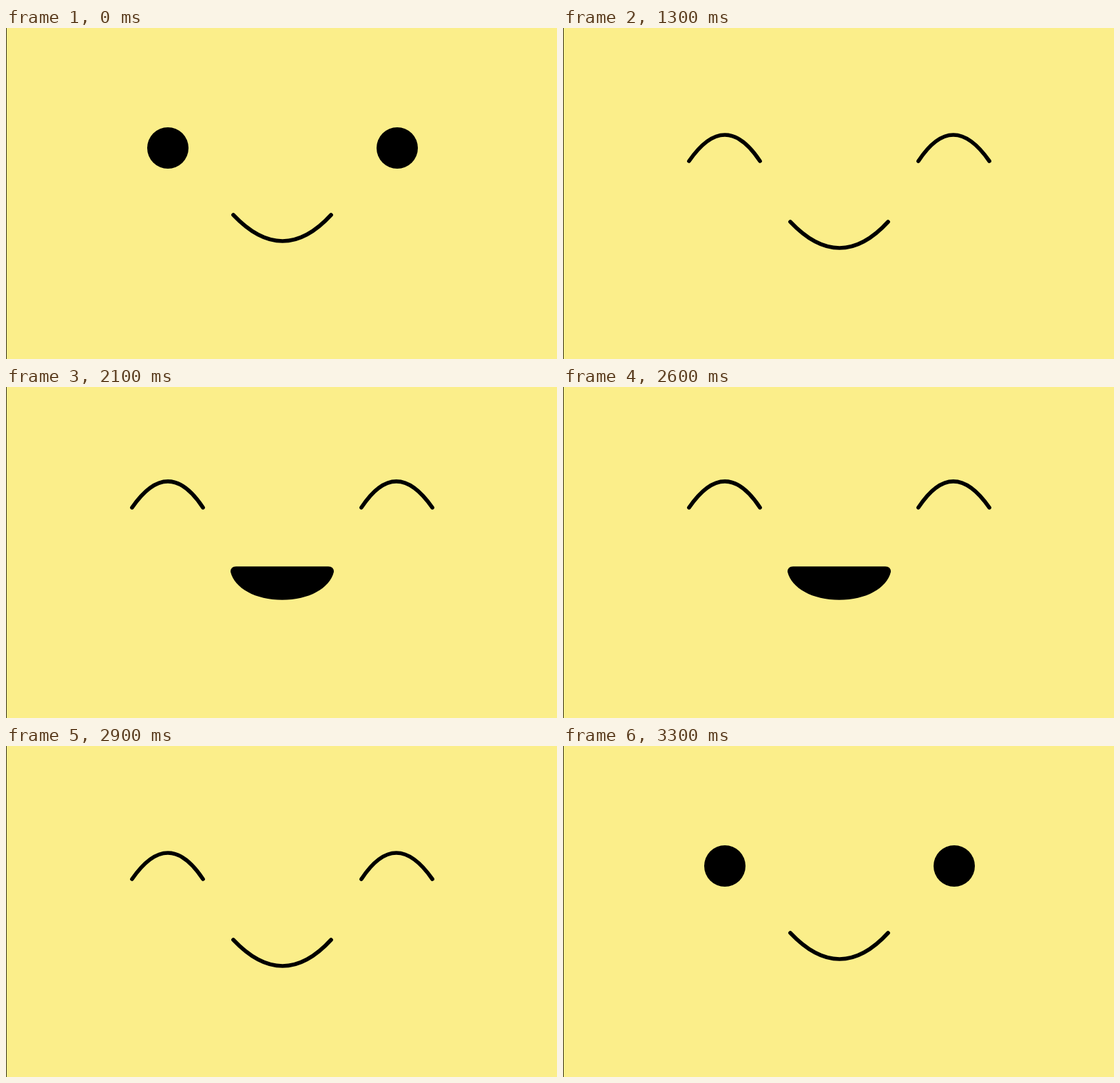
Write an HTML page that moves like this. It is 800x480 px and loops after 3400 ms.

```html
<!DOCTYPE html>
<html lang="en">
<head>
<meta charset="utf-8">
<title>Smiling face</title>
<style>
  html, body { margin: 0; height: 100%; overflow: hidden; background: #fbee8a; }
  svg { display: block; width: 800px; height: 480px; }
  .line { fill: none; stroke: #000; stroke-width: 5.7; stroke-linecap: round; }
</style>
</head>
<body>
<svg viewBox="0 0 800 480">
  <rect width="800" height="480" fill="#fbee8a"/>
  <rect width="1" height="480" fill="#33301c"/>
  <g id="openEyes">
    <circle cx="235" cy="174" r="30"/>
    <circle cx="568" cy="174" r="30"/>
  </g>
  <path id="shutEyes" class="line" d="M183 193Q235.5 117 286 193M516 193Q566 117 619 193"/>
  <path id="smile" class="line" d="M330 271Q402 347 472 271"/>
  <path id="laugh"/>
</svg>
<script>
const LOOP = 3400, STEP = 100;
const EYE_LIFT = 18.2, MOUTH_DIP = 10;

const [openEyes, shutEyes, smile, laugh] =
  ["openEyes", "shutEyes", "smile", "laugh"].map(id => document.getElementById(id));

// Linear rise from 0 to 1 between two times.
const ramp = (time, from, to) => Math.min(1, Math.max(0, (time - from) / (to - from)));

function place(part, visible, dy) {
  part.style.display = visible ? "" : "none";
  part.setAttribute("transform", `translate(0 ${dy})`);
}

// The upper lip sags until the mouth is fully open.
function laughPath(opening) {
  const lip = 260.3 + 60 * (1 - opening);
  return `M334 260.3Q401 ${lip} 468 260.3Q476 260.5 476 268` +
    "C470 292 440 308.7 401 308.7S332 292 326 268Q326 260.5 334 260.3Z";
}

function draw(now) {
  const time = Math.floor((now % LOOP) / STEP) * STEP;
  const shut = time >= 1200 && time < 3300;
  const opening = ramp(time, 1400, 1600) - ramp(time, 2700, 2900);
  const dip = ramp(time, 1100, 1300) - ramp(time, 3100, 3300);
  const mouthShift = MOUTH_DIP * dip * (1 - opening);

  place(openEyes, !shut, 0);
  place(shutEyes, shut, -EYE_LIFT * opening);
  place(smile, !opening, mouthShift);
  place(laugh, opening, mouthShift);
  laugh.setAttribute("d", laughPath(opening));
}

function frame() {
  draw(performance.now());
  requestAnimationFrame(frame);
}
frame();
</script>
</body>
</html>
```
